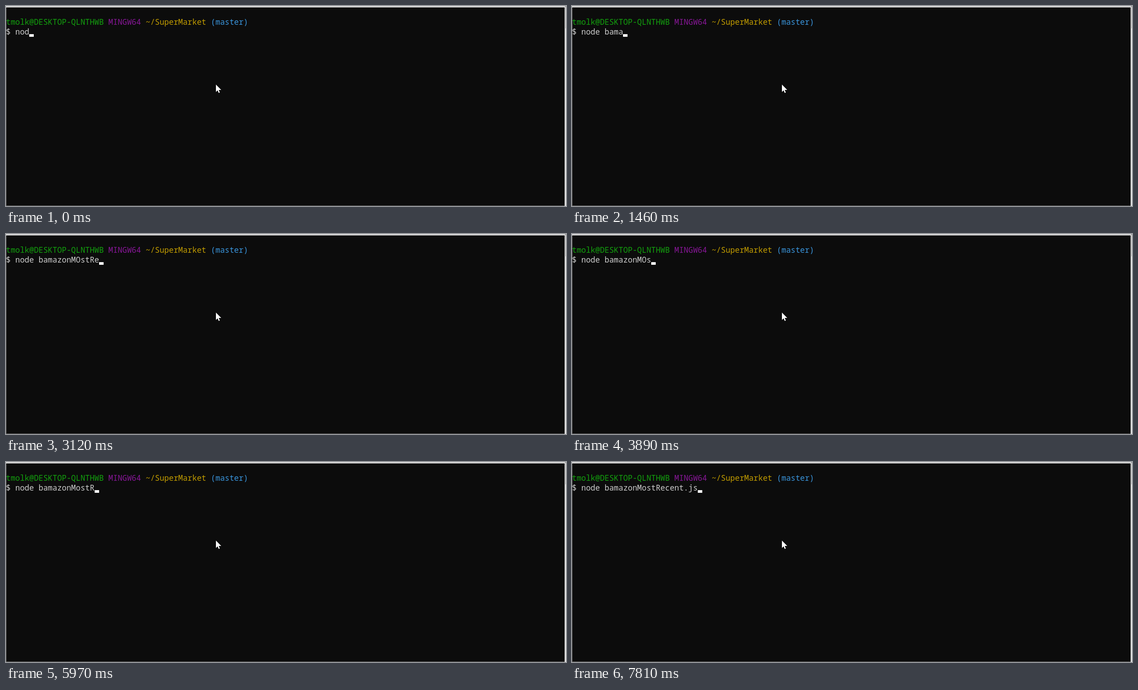
Write an HTML page with a canvas that moves like this. It is 1251x448 px and loops after 8 s.

```html
<!DOCTYPE html>
<html lang="en">
<head>
<meta charset="utf-8">
<title>Terminal</title>
<style>
  html, body { margin: 0; width: 100%; height: 100%; overflow: hidden; background: #0c0c0c; }
  canvas { display: block; }
</style>
</head>
<body>
<canvas id="stage" width="1251" height="448"></canvas>
<script>
const ctx = document.getElementById('stage').getContext('2d');
const LOOP = 8000;
const CELL = 10.4;
const FONT = '17.33px "Noto Sans Mono", "DejaVu Sans Mono", monospace';

const PROMPT = [
  [0, 'tmolk@DESKTOP-QLNTHWB', '#13a10e'],
  [22, 'MINGW64', '#881798'],
  [30, '~/SuperMarket', '#c19c00'],
  [44, '(master)', '#3a96dd'],
];

// Keystrokes: '<' deletes, '_' hides the caret until the next key.
const KEYS = [
  [0, 'nod'], [120, 'e'], [370, '_'], [770, ' b'], [930, 'a'], [1180, 'm'],
  [1460, 'a'], [1760, 'zo'], [2010, 'n'], [2260, 'M'], [2390, 'O'],
  [2510, 's'], [2630, 't'], [3000, 'R'], [3120, 'e'], [3520, '<'],
  [3770, '<'], [3890, '<'], [4010, '<'], [4130, '_'], [4500, '<'],
  [4620, 'o'], [4770, 's'], [5050, '_'], [5300, 't'], [5570, '_'],
  [5970, 'R'], [6100, 'e'], [6500, 'c'], [6620, '_'], [6890, 'e'],
  [7020, 'n'], [7170, 't'], [7420, '.'], [7670, 'j'], [7810, 's'],
];

function typedAt(time) {
  let line = '$ ';
  let caret = true;
  for (const [at, key] of KEYS) {
    if (at > time) break;
    caret = key !== '_';
    if (key === '<') line = line.slice(0, -1);
    else if (caret) line += key;
  }
  return { line, caret };
}

function rect(color, x, y, w, h) {
  ctx.fillStyle = color;
  ctx.fillRect(x, y, w, h);
}

function print(text, column, baseline, color) {
  ctx.fillStyle = color;
  [...text].forEach((ch, i) => ctx.fillText(ch, (column + i) * CELL, baseline));
}

function drawWindow() {
  rect('#0c0c0c', 0, 0, 1251, 448);
  rect('#6e6e6e', 0, 0, 1, 448);
  rect('#6e6e6e', 0, 447, 1251, 1);
  rect('#8a8a8a', 0, 0, 1251, 1);
  rect('#ffffff', 0, 1, 1251, 2);
  rect('#e6e6e6', 1248, 1, 2, 447);
  rect('#8a8a8a', 1250, 0, 1, 50);
  rect('#cdcdcd', 1250, 50, 1, 398);
}

function drawPointer() {
  const points = [[0, 0], [0, 16.5], [3.8, 13], [6.2, 18.8], [8.7, 17.7], [6.2, 12], [11.8, 12]];
  ctx.beginPath();
  for (const [x, y] of points) ctx.lineTo(469 + x, 176 + y);
  ctx.closePath();
  ctx.fillStyle = '#ffffff';
  ctx.fill();
}

function draw(time) {
  const { line, caret } = typedAt(time);
  drawWindow();
  ctx.font = FONT;
  for (const [column, text, color] of PROMPT) print(text, column, 42, color);
  print(line, 0, 64, '#cccccc');
  if (caret) rect('#ffffff', Math.round(line.length * CELL), 63, 10, 6);
  drawPointer();
}

const start = performance.now();
function tick() {
  draw((performance.now() - start) % LOOP);
  requestAnimationFrame(tick);
}
tick();
</script>
</body>
</html>
```
